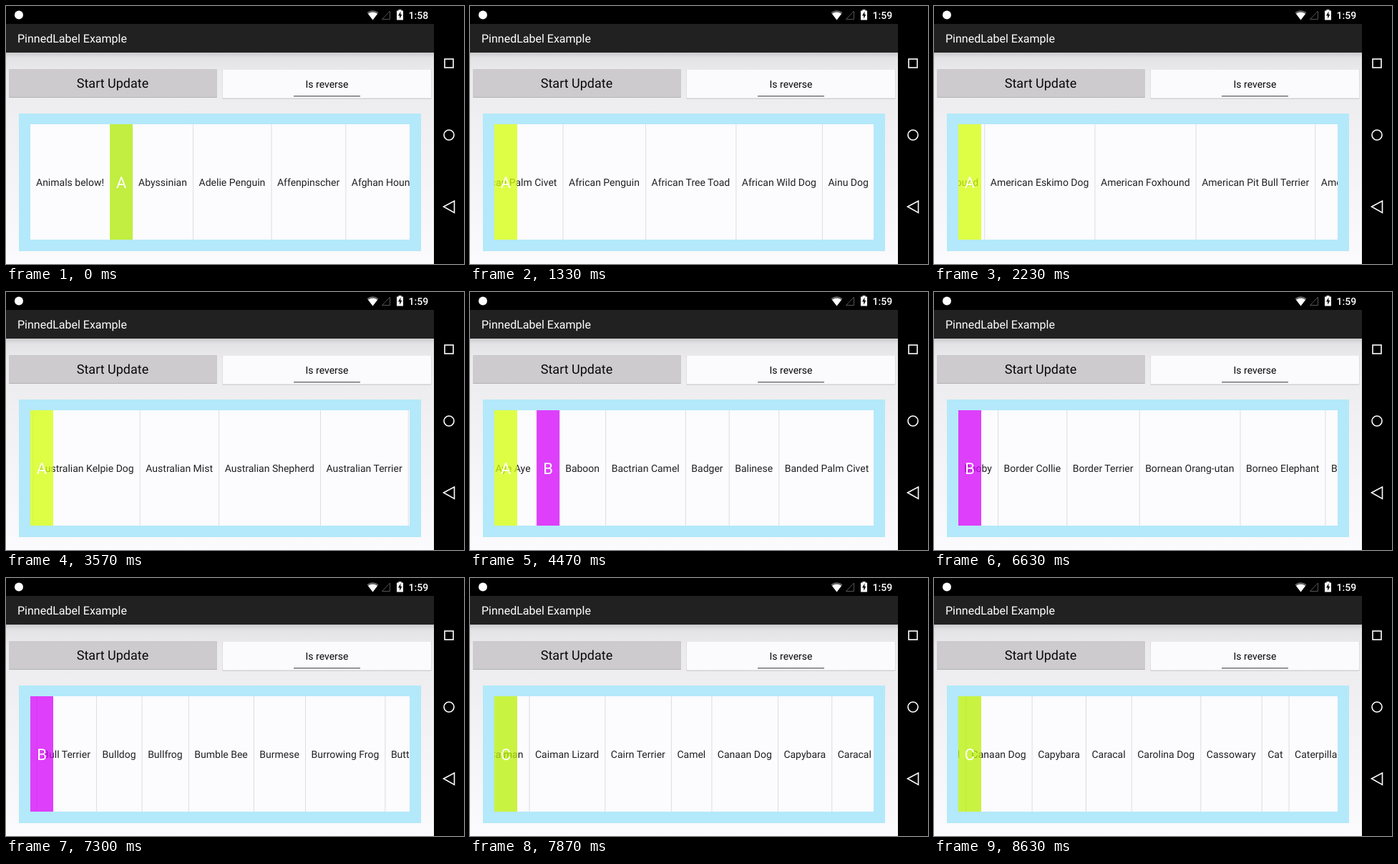
These frames come from a looping animation (640 px wide and 360 px high, 8660 ms). An HTML page:

```html
<!DOCTYPE html>
<html lang="en">
<head>
<meta charset="utf-8">
<title>Pinned list headers</title>
<style>
  html, body { margin: 0; width: 100%; height: 100%; overflow: hidden; background: #000; }
  body > svg { display: block; width: 640px; height: 360px; }
  text { font-family: Roboto, "Noto Sans", sans-serif; font-size: 14px; fill: #212121; text-rendering: geometricPrecision; }
  .light { fill: #fff; }
  .letter { font-size: 22px; fill: #fff; text-anchor: middle; }
  .nav { fill: none; stroke: #fff; stroke-width: 1.6; }
</style>
</head>
<body>
<svg viewBox="0 0 640 360">
  <defs>
    <linearGradient id="page" x1="0" y1="0" x2="0" y2="1">
      <stop offset="0" stop-color="#cbcacc"/>
      <stop offset=".025" stop-color="#e3e2e4"/>
      <stop offset=".1" stop-color="#ebeaec"/>
      <stop offset=".4" stop-color="#f1f0f2"/>
      <stop offset="1" stop-color="#fbfafc"/>
    </linearGradient>
  </defs>
  <rect width="640" height="360"/>
  <rect y="65" width="598" height="295" fill="url(#page)"/>
  <rect y="25" width="598" height="40" fill="#212121"/>
  <text class="light" x="16" y="51" style="font-size:16px">PinnedLabel Example</text>

  <!-- status bar -->
  <circle cx="18" cy="12.5" r="6" fill="#fff"/>
  <path d="M504.500 9Q512.500 3.500 520.500 9L512.500 19.500Z" fill="#666"/>
  <path class="light" d="M506 11Q512.500 6.500 519 11L512.500 19.500Z"/>
  <path d="M525.500 18.500H536.500V7Z" fill="none" stroke="#555"/>
  <path class="light" d="M546 6.500H548.500V5H552.500V6.500H555V19.500H546Z"/>
  <path d="M551.500 7.500L548 13.500H550.200V18L553.300 11.700H551.300Z"/>
  <text id="clock" class="light" x="562.500" y="18" style="font-weight:500"></text>

  <!-- navigation keys -->
  <g class="nav">
    <rect x="613" y="74" width="12" height="12"/>
    <circle cx="619" cy="180" r="7"/>
    <path d="M611.500 280L626.500 272V288.500Z"/>
  </g>

  <!-- controls -->
  <rect x="4" y="89" width="291" height="39" rx="1" fill="#999" opacity=".7"/>
  <rect x="4" y="88" width="291" height="39" rx="1" fill="#cdcbce"/>
  <text x="149" y="114" text-anchor="middle" style="font-size:18px;fill:#080808">Start Update</text>
  <rect x="302.500" y="89" width="292" height="41" rx="1" fill="#c8c7c9" opacity=".7"/>
  <rect x="303" y="89" width="291" height="39.500" rx="1" fill="#fbfafc"/>
  <text x="448.500" y="114" text-anchor="middle" style="fill:#080808">Is reverse</text>
  <rect x="402" y="125" width="93" height="1.500" fill="#757575"/>

  <!-- list -->
  <rect x="18" y="150" width="562" height="192" fill="#b3e9fa"/>
  <svg x="34" y="165" width="530" height="161" overflow="hidden">
    <rect width="530" height="161" fill="#fcfbfe"/>
    <g id="strip"></g>
    <g id="pinned"></g>
  </svg>
</svg>
<script>
const LOOP = 8660, HEAD = 32, GAP = 16.6, LEFT = 34;
const groups = {
  A: 'Abyssinian,Adelie Penguin,Affenpinscher,Afghan Hound,African Bush Elephant,African Civet,African Clawed Frog,African Forest Elephant,African Palm Civet,African Penguin,African Tree Toad,African Wild Dog,Ainu Dog,Airedale Terrier,Akbash,Akita,Alaskan Malamute,Albatross,Aldabra Giant Tortoise,Alligator,Alpine Dachsbracke,American Bulldog,American Cocker Spaniel,American Coonhound,American Eskimo Dog,American Foxhound,American Pit Bull Terrier,American Staffordshire Terrier,American Water Spaniel,Anatolian Shepherd Dog,Angelfish,Ant,Anteater,Antelope,Appenzeller Dog,Arctic Fox,Arctic Hare,Arctic Wolf,Armadillo,Asian Elephant,Asian Giant Hornet,Asian Palm Civet,Asiatic Black Bear,Australian Cattle Dog,Australian Kelpie Dog,Australian Mist,Australian Shepherd,Australian Terrier,Avocet,Axolotl,Aye Aye',
  B: 'Baboon,Bactrian Camel,Badger,Balinese,Banded Palm Civet,Bandicoot,Barb,Barn Owl,Barnacle,Barracuda,Basenji Dog,Basking Shark,Basset Hound,Bat,Bavarian Mountain Hound,Beagle,Bear,Bearded Collie,Bearded Dragon,Beaver,Bedlington Terrier,Beetle,Bengal Tiger,Bernese Mountain Dog,Bichon Frise,Binturong,Bird,Birds Of Paradise,Birman,Bison,Black Bear,Black Rhinoceros,Black Russian Terrier,Black Widow Spider,Bloodhound,Blue Lacy Dog,Blue Whale,Bluetick Coonhound,Bobcat,Bolognese Dog,Bombay,Bongo,Bonobo,Booby,Border Collie,Border Terrier,Bornean Orang-utan,Borneo Elephant,Boston Terrier,Bottle Nosed Dolphin,Boxer Dog,Boykin Spaniel,Brazilian Terrier,Brown Bear,Budgerigar,Buffalo,Bull Mastiff,Bull Shark,Bull Terrier,Bulldog,Bullfrog,Bumble Bee,Burmese,Burrowing Frog,Butterfly,Butterfly Fish',
  C: 'Caiman,Caiman Lizard,Cairn Terrier,Camel,Canaan Dog,Capybara,Caracal,Carolina Dog,Cassowary,Cat,Caterpillar,Catfish'
};
const rowColor = { A: '#aeea00', B: '#d500f9', C: '#b9f002' };
const pinColor = { ...rowColor, A: '#d4ff08' };

const $ = id => document.getElementById(id);
const strip = $('strip'), pinned = $('pinned'), clock = $('clock');

function add(parent, tag, attrs, label) {
  const el = document.createElementNS('http://www.w3.org/2000/svg', tag);
  for (const k in attrs) el.setAttribute(k, attrs[k]);
  if (label) el.textContent = label;
  return parent.appendChild(el);
}

function addHeader(parent, x, letter, fill) {
  const g = add(parent, 'g', { transform: `translate(${x})` });
  add(g, 'rect', { width: HEAD, height: 161, fill, 'fill-opacity': .75 });
  add(g, 'text', { class: 'letter', x: HEAD / 2, y: 89 }, letter);
  return g;
}

// Lay the rows out from left to right
const at = {}, heads = [];
let end = 0;
function addRow(name, divided) {
  at[name] = end;
  const width = add(strip, 'text', { x: end + 8, y: 86 }, name).getComputedTextLength();
  end += width + GAP;
  if (divided) add(strip, 'rect', { x: end - .5, width: 1, height: 161, fill: '#dcdede' });
}
addRow('Animals below!', false);
end -= .6;
for (const letter in groups) {
  heads.push({
    x: end,
    row: addHeader(strip, end, letter, rowColor[letter]),
    pin: addHeader(pinned, 0, letter, pinColor[letter])
  });
  end += HEAD;
  groups[letter].split(',').forEach(name => addRow(name, true));
}

// Each fling: start, stop, a moment between, and the scroll at that moment and at the stop
const scrollTo = (name, x) => at[name] + LEFT - x;
let from = 0;
const flings = [
  [900, 2500, 2230, scrollTo('American Eskimo Dog', 70.8), scrollTo('American Eskimo Dog', -164)],
  [2500, 4730, 3570, scrollTo('Australian Mist', 187.3), scrollTo('Australian Mist', -493)],
  [5030, 6630, 5630, scrollTo('Black Bear', 65.5), scrollTo('Border Collie', 89.6)],
  [6630, 8630, 7870, scrollTo('Caiman Lizard', 83), scrollTo('Canaan Dog', 44.6)]
].map(([t0, t1, tm, mid, to]) => {
  const power = Math.log((to - mid) / (to - from)) / Math.log((t1 - tm) / (t1 - t0));
  const fling = { t0, t1, from, to, power };
  from = to;
  return fling;
});

function scrollAt(t) {
  const f = flings.findLast(f => t >= f.t0);
  if (!f) return 0;
  const left = Math.max(0, (f.t1 - t) / (f.t1 - f.t0));
  return f.to - (f.to - f.from) * left ** f.power;
}

// 30 pictures a second, each starting on a whole hundredth
const snap = t => Math.round(Math.floor((t + 3.5) * .03) * 10 / 3) * 10;

function draw(now) {
  const t = snap(now % LOOP), scroll = scrollAt(t);
  clock.textContent = t < 600 ? '1:58' : '1:59';
  strip.setAttribute('transform', `translate(${-scroll})`);
  heads.forEach((h, i) => {
    const next = heads[i + 1] ? heads[i + 1].x - scroll : Infinity;
    const stuck = h.x < scroll && next > 0;
    h.pin.setAttribute('visibility', stuck ? 'visible' : 'hidden');
    h.row.setAttribute('visibility', h.x < scroll ? 'hidden' : 'visible');
    h.pin.setAttribute('transform', `translate(${Math.min(0, next - HEAD)})`);
  });
}

const start = performance.now();
function tick() {
  draw(performance.now() - start);
  requestAnimationFrame(tick);
}
tick();
</script>
</body>
</html>
```
